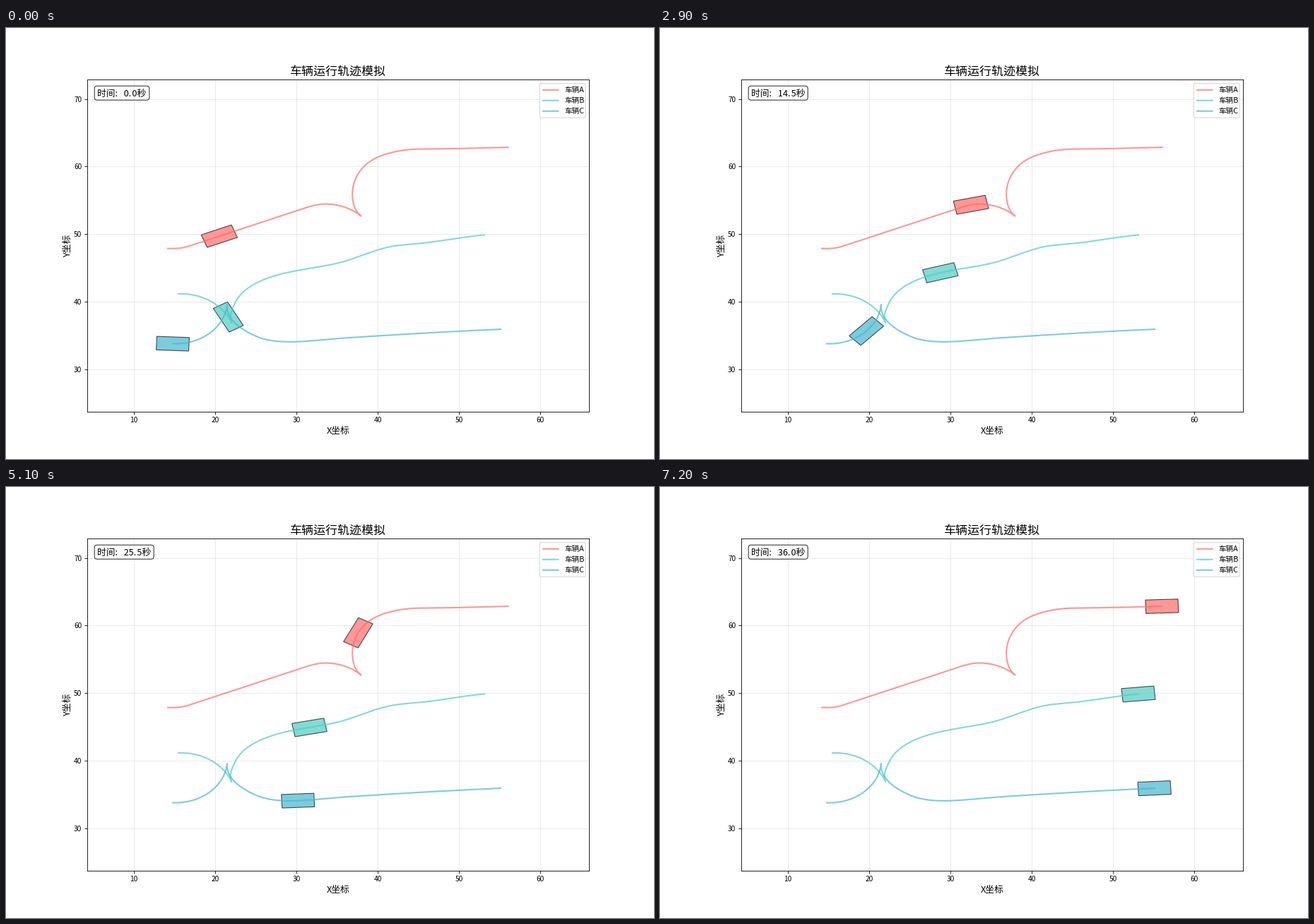
Recreate the animation shown at these times as a matplotlib script. Size 917 px wide and 611 px high, loop 7300 ms.

```python
import numpy as np
import matplotlib.pyplot as plt
from matplotlib.animation import FuncAnimation
from matplotlib.lines import Line2D
from matplotlib.patches import FancyBboxPatch, Polygon
from matplotlib.transforms import Affine2D

W, H, DPI = 917, 611, 76.4
FRAMES, INTERVAL = 73, 100
LENGTH, WIDTH = 4, 2

# Each vehicle drives to a cusp, then leaves it in the opposite direction.
# Knots are (x, y, heading in degrees); the last one of "inbound" is the cusp.
# Drive keys are (seconds, distance, speed).
VEHICLES = [
    dict(name="车辆A", color="#FF6B6B",
         inbound=[(14.17, 47.88, -3), (16.69, 48.2, 21.55),
                  (30.69, 53.73, 21.55), (33.55, 54.46, 0),
                  (37.94, 52.68, -44)],
         outbound=[(36.89, 55.38, 94.3), (40.25, 61.52, 24.8),
                   (45.11, 62.58, 0.5), (56.02, 62.85, 2)],
         drive=[(0, 6.66, 12), (2.2, 17.15, 0.6), (3.95, 25.43, 4),
                (7.2, 51.76, 10.8)]),
    dict(name="车辆B", color="#4ECDC4",
         inbound=[(15.48, 41.16, 3), (22.02, 36.88, -69)],
         outbound=[(22.43, 39.8, 68.8), (27.71, 43.98, 18.6),
                   (35.22, 45.76, 16.7), (41.64, 48.17, 12.9),
                   (45.11, 48.62, 6.8), (53.11, 49.87, 5.3)],
         drive=[(0, 7.39, 0), (2.4, 19, 1), (4.4, 20.1, 0.3),
                (7.2, 44.55, 13)]),
    dict(name="车辆C", color="#45B7D1",
         inbound=[(14.78, 33.8, -3), (21.47, 39.59, 85)],
         outbound=[(25.04, 34.9, -27.4), (29.21, 34.08, 0),
                   (35.86, 34.64, 4.5), (55.11, 35.94, 3)],
         drive=[(1.5, 0, 1.8), (4.5, 16.03, 7.3), (7.2, 46.28, 11.5)]),
]


def hermite(s, p0, p1, m0, m1):
    """Cubic from p0 to p1 with end slopes m0 and m1, for s in 0..1."""
    r = 1 - s
    return (p0 * (1 + 2 * s) * r ** 2 + m0 * s * r ** 2
            + p1 * (3 - 2 * s) * s ** 2 - m1 * r * s ** 2)


def unit(degrees):
    angle = np.radians(degrees)
    return np.array([np.cos(angle), np.sin(angle)])


def bend(a, b):
    """Points of a near-circular curve between two knots."""
    start, end = np.array(a[:2]), np.array(b[:2])
    turn = (b[2] - a[2] + 180) % 360 - 180
    pull = np.hypot(*(end - start)) / np.cos(np.radians(turn / 4)) ** 2
    s = np.linspace(0, 1, 100)[:, None]
    return hermite(s, start, end, pull * unit(a[2]), pull * unit(b[2]))


class Track:
    def __init__(self, inbound, outbound, drive):
        x, y, heading = inbound[-1]
        legs = inbound, [(x, y, heading + 180), *outbound]
        curves = [np.vstack([bend(a, b) for a, b in zip(leg, leg[1:])])
                  for leg in legs]
        self.points = np.vstack(curves)
        self.headings = np.vstack([np.gradient(c, axis=0) for c in curves])
        steps = np.hypot(*np.diff(self.points, axis=0).T)
        self.arc = np.r_[0, np.cumsum(steps)]
        self.drive = drive

    def distance(self, t):
        t = max(t, self.drive[0][0])
        for (t0, d0, v0), (t1, d1, v1) in zip(self.drive, self.drive[1:]):
            if t <= t1:
                span = t1 - t0
                return hermite((t - t0) / span, d0, d1, v0 * span, v1 * span)
        return self.drive[-1][1]

    def outline(self, t):
        """Corners of the vehicle at t seconds."""
        d = self.distance(t)
        x, y, dx, dy = (np.interp(d, self.arc, col) for col in
                        (*self.points.T, *self.headings.T))
        along = np.array([dx, dy]) / np.hypot(dx, dy)
        across = np.array([-along[1], along[0]])
        a, b = along * LENGTH / 2, across * WIDTH / 2
        return np.array([x, y]) + [a + b, a - b, -a - b, -a + b]


plt.rcParams["font.family"] = ["Noto Sans CJK JP", "DejaVu Sans"]

# The small surplus keeps the pixel size from being rounded down.
fig = plt.figure(figsize=((W + 0.01) / DPI, (H + 0.01) / DPI), dpi=DPI)
ax = fig.add_axes([0.125, 0.11, 0.775, 0.77])
ax.set_xlim(4.23, 66)
ax.set_ylim(23.76, 72.84)
ax.set_xticks(range(10, 61, 10))
ax.set_yticks(range(30, 71, 10))
ax.tick_params(labelsize=9.5)
ax.grid(True, alpha=0.3)
ax.set_title("车辆运行轨迹模拟", fontsize=16)

# Stage pixels with the origin at the top left.
stage = Affine2D().scale(1 / W, -1 / H).translate(0, 1) + fig.transFigure


def label(x, y, text, size, **kw):
    return fig.text(x, y, text, fontsize=size, transform=stage, **kw)


def panel(x, y, w, h, style, edge):
    box = FancyBboxPatch((x, y), w, h, boxstyle=style, facecolor="white",
                         edgecolor=edge, alpha=0.8, lw=1, transform=stage)
    return fig.add_artist(box)


label(470, 574.6, "X坐标", 12, ha="center")
label(90.6, 308.8, "Y坐标", 12, ha="center", rotation=90,
      rotation_mode="anchor")

time_box = panel(129, 86, 70, 12.4, "round,pad=3.8", "black")
time_text = label(128.9, 96.8, "", 12)

panel(755, 78.7, 65, 48.5, "round,pad=0,rounding_size=2.1", "0.8")

cars = []
for row, car in enumerate(VEHICLES):
    track = Track(car["inbound"], car["outbound"], car["drive"])
    stroke = dict(color=car["color"], lw=2, alpha=0.7)
    ax.plot(*track.points.T, **stroke)
    body = Polygon(track.outline(0), closed=True, facecolor=car["color"],
                   edgecolor="black", lw=1, alpha=0.7)
    ax.add_patch(body)
    cars.append((track, body))

    y = 87.8 + 15 * row
    fig.add_artist(Line2D([760, 781.5], [y, y], transform=stage, snap=False,
                          **stroke))
    label(790, y + 3.6, car["name"], 10)


def update(frame):
    for track, body in cars:
        body.set_xy(track.outline(frame * INTERVAL / 1000))
    seconds = frame * 0.5
    # Thin spaces keep the colon and the point as wide as a digit.
    number = f"{seconds:.1f}".replace(".", ".\u200a")
    time_text.set_text(f"时间:\u2002\u2009{number}秒")
    time_box.set_width(76.4 if seconds >= 10 else 70)
    return [body for _, body in cars] + [time_text, time_box]


anim = FuncAnimation(fig, update, frames=FRAMES, interval=INTERVAL,
                     repeat=True, blit=False)
plt.show()
```
